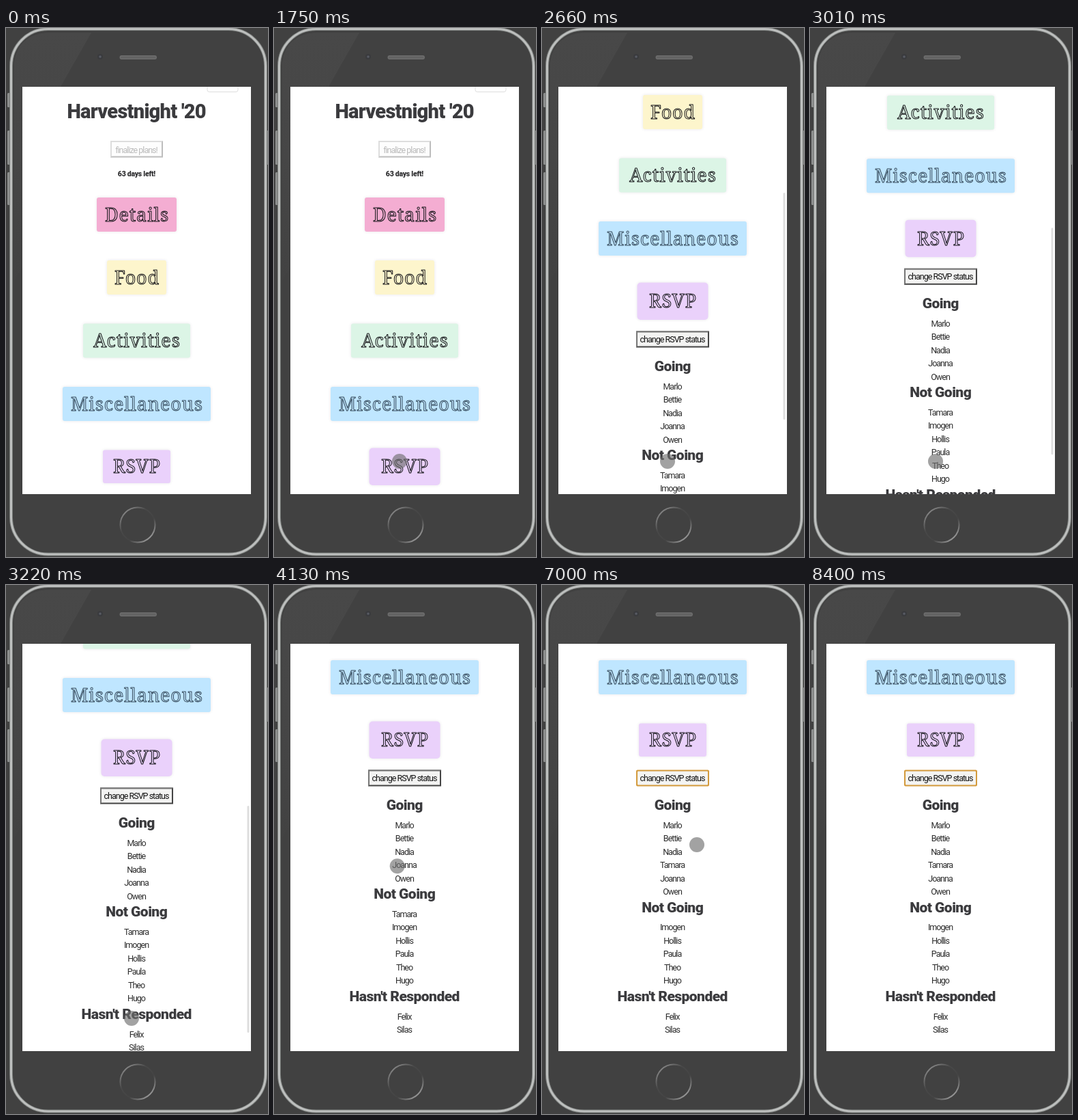
An HTML page with a canvas that plays this animation: 384 px wide and 774 px high, repeating every 8.47 s.

```html
<!DOCTYPE html>
<html lang="en">
<head>
<meta charset="utf-8">
<title>Party planner on a phone</title>
<style>
  html, body { margin: 0; width: 100%; height: 100%; overflow: hidden; background: #414141; }
  canvas { display: block; }
</style>
</head>
<body>
<canvas id="stage" width="384" height="774"></canvas>
<script>
const ctx = document.getElementById('stage').getContext('2d');
const LOOP = 8470, STEP = 70;
const SCREEN = { x: 24, y: 86, w: 335, h: 596 };
const CENTER = 191.5;

const FACES = {
  display: { style: '900', family: 'Roboto, sans-serif', advance: .48, sample: "Hasn't Responded" },
  narrow: { style: '400', family: 'Roboto, sans-serif', advance: .422, sample: 'change RSVP status' },
  hollow: { style: '400', family: '"Noto Serif", serif', advance: .552, sample: 'Miscellaneous' }
};

const CARDS = [
  { label: 'Details', x: 133, y: 248, w: 117, h: 50, color: '#f4add2' },
  { label: 'Food', x: 148, y: 340, w: 87, h: 50, color: '#fdf5cc' },
  { label: 'Activities', x: 113, y: 432.5, w: 157, h: 50, color: '#dcf5e6' },
  { label: 'Miscellaneous', x: 83, y: 525, w: 217, h: 50, color: '#bfe6ff', ink: '#34495a' },
  { label: 'RSVP', x: 142, y: 617.5, w: 99, h: 48.5, color: '#ead1fb' }
];

const MOVED = 'Tamara';
const GOING = ['Marlo', 'Bettie', 'Nadia', 'Joanna', 'Owen'];
const NOT_GOING = ['Imogen', 'Hollis', 'Paula', 'Theo', 'Hugo'];
const PENDING = ['Felix', 'Silas'];

// Keyframes: time, then values
const SCROLL = [[2150, 0], [2660, 242], [3220, 389], [3400, 415]];
const HOVER = [[910, 0], [1050, 1], [5600, 1], [5740, 0]];
const POINTER = [
  [250, 230, 790], [900, 184, 634], [3420, 184, 634], [3640, 183, 575],
  [4520, 179, 295], [5200, 179, 295], [5390, 181, 297], [5800, 181, 297],
  [6350, 227, 380], [7700, 227, 380], [7980, 228, 725], [8190, 228, 725], [8340, 231, 790]
];
const TAPS = [{ t: 1820, x: 184, y: 634 }, { t: 5250, x: 179, y: 295 }];
const FOCUS_AT = 5600, MOVE_AT = 6510;

const clamp = v => Math.max(0, Math.min(1, v));
const smooth = v => v * v * (3 - 2 * v);

function track(keys, t, ease = v => v) {
  const next = keys.findIndex(k => k[0] > t);
  if (next === 0) return keys[0].slice(1);
  if (next < 0) return keys[keys.length - 1].slice(1);
  const a = keys[next - 1], b = keys[next];
  const p = ease((t - a[0]) / (b[0] - a[0]));
  return a.slice(1).map((v, i) => v + (b[i + 1] - v) * p);
}

function box(x, y, w, h, r, color) {
  ctx.beginPath();
  ctx.roundRect(x, y, w, h, r);
  ctx.fillStyle = color;
  ctx.fill();
}

function disc(x, y, r, color) {
  ctx.beginPath();
  ctx.arc(x, y, r, 0, Math.PI * 2);
  ctx.fillStyle = color;
  ctx.fill();
}

function linear(x0, y0, x1, y1, colors) {
  const g = ctx.createLinearGradient(x0, y0, x1, y1);
  colors.forEach((c, i) => g.addColorStop(i / (colors.length - 1), c));
  return g;
}

// Each face is tracked evenly to its average advance.
function useFace(face, size) {
  ctx.letterSpacing = '0px';
  ctx.font = `${face.style} ${size}px ${face.family}`;
  const natural = ctx.measureText(face.sample).width / face.sample.length;
  const tracking = face.advance * size - natural;
  ctx.letterSpacing = tracking + 'px';
  return tracking;
}

function text(str, y, face, size, color) {
  const x = CENTER + useFace(face, size) / 2;
  const base = y + size * .36;
  ctx.textAlign = 'center';
  if (face === FACES.hollow) {
    ctx.strokeStyle = color;
    ctx.lineWidth = 1;
    ctx.lineJoin = 'round';
    ctx.strokeText(str, x, base);
  } else {
    ctx.fillStyle = color;
    ctx.fillText(str, x, base);
  }
}

function bevel(x, y, w, h, light, dark, fill) {
  box(x, y, w, h, 0, dark);
  ctx.beginPath();
  ctx.moveTo(x, y + h);
  ctx.lineTo(x, y);
  ctx.lineTo(x + w, y);
  ctx.lineTo(x + w - 2, y + 2);
  ctx.lineTo(x + 2, y + h - 2);
  ctx.fillStyle = light;
  ctx.fill();
  box(x + 2, y + 2, w - 4, h - 4, 0, fill);
}

function drawPhone() {
  ctx.fillStyle = '#414141';
  ctx.fillRect(0, 0, 384, 774);
  for (const [x, y, h] of [[2, 95, 21], [2, 150, 50], [2, 211, 48], [381, 150, 50]]) {
    box(x, y, 4, h, 1.5, '#8d8f8e');
  }

  ctx.beginPath();
  ctx.moveTo(12, 50);
  ctx.quadraticCurveTo(18, 10, 60, 7);
  ctx.lineTo(125, 7);
  ctx.lineTo(80, 86);
  ctx.lineTo(24, 86);
  ctx.lineTo(24, 350);
  ctx.lineTo(12, 370);
  ctx.fillStyle = linear(0, 7, 0, 370, ['#484848', '#464646', '#424242']);
  ctx.fill();

  ctx.beginPath();
  ctx.roundRect(7.5, 1.5, 373, 768.5, 54);
  ctx.lineWidth = 5;
  ctx.strokeStyle = '#777a78';
  ctx.stroke();
  ctx.lineWidth = 3;
  ctx.strokeStyle = '#bdbfbe';
  ctx.stroke();

  disc(138, 42, 4, '#3a3b3e');
  disc(138, 42, 1.8, '#585b64');
  box(166.5, 40, 54.5, 6, 3, '#6c6c6c');
  box(168, 41.5, 51.5, 3, 1.5, '#626262');

  ctx.beginPath();
  ctx.arc(193, 727, 25.5, 0, Math.PI * 2);
  ctx.lineWidth = 2;
  ctx.strokeStyle = linear(175, 707, 211, 747, ['#858585', '#484848', '#444444', '#999999']);
  ctx.stroke();
}

function drawCard(card, hover) {
  const gx = hover * 2.5, gy = hover * 3;
  ctx.save();
  ctx.shadowColor = 'rgba(70,60,80,.13)';
  ctx.shadowBlur = 4;
  box(card.x - gx, card.y - gy, card.w + 2 * gx, card.h + 2 * gy, 3 + hover * 2, card.color);
  ctx.restore();
  text(card.label, card.y + card.h / 2, FACES.hollow, 27, card.ink || '#141418');
}

function drawStatusButton(focused) {
  if (focused) {
    box(138, 685.5, 107, 24, 2, '#d39a3c');
    box(140, 687.5, 103, 20, 1, '#f4f4f2');
  } else {
    bevel(138, 685.5, 107, 24, '#777777', '#444444', '#f3f3f2');
  }
  text('change RSVP status', 697.7, FACES.narrow, 12.5, '#111111');
}

function drawGuests(moved) {
  const groups = [
    ['Going', moved ? [...GOING.slice(0, 3), MOVED, ...GOING.slice(3)] : GOING],
    ['Not Going', moved ? NOT_GOING : [MOVED, ...NOT_GOING]],
    ["Hasn't Responded", PENDING]
  ];
  let y = 736.5;
  for (const [heading, names] of groups) {
    text(heading, y, FACES.display, 21, '#3b3b3e');
    y += 29.5;
    for (const name of names) {
      text(name, y, FACES.narrow, 12.5, '#2c2c2c');
      y += 19.5;
    }
    y += 3.3;
  }
}

function drawPage(t) {
  const [scroll] = track(SCROLL, t);
  const [hover] = track(HOVER, t, smooth);
  ctx.save();
  ctx.beginPath();
  ctx.rect(SCREEN.x, SCREEN.y, SCREEN.w, SCREEN.h);
  ctx.clip();
  ctx.fillStyle = '#ffffff';
  ctx.fillRect(SCREEN.x, SCREEN.y, SCREEN.w, SCREEN.h);

  ctx.save();
  ctx.translate(0, -scroll);
  ctx.beginPath();
  ctx.roundRect(295, 70, 45, 23.5, 3);
  ctx.lineWidth = 1;
  ctx.strokeStyle = '#dedede';
  ctx.stroke();
  text("Harvestnight '20", 121.5, FACES.display, 29, '#3b3b3e');
  bevel(153, 165, 77, 24.5, '#dddddd', '#bdbdbd', '#fdfdfd');
  text('finalize plans!', 178, FACES.narrow, 12.5, '#bababa');
  text('63 days left!', 213, FACES.display, 10.5, '#2e2e30');
  CARDS.forEach(card => drawCard(card, card.label === 'RSVP' ? hover : 0));
  drawStatusButton(t >= FOCUS_AT);
  drawGuests(t >= MOVE_AT);
  ctx.restore();

  if (t >= 2150 && t < 3640) {
    ctx.globalAlpha = 1 - clamp((t - 3460) / 180);
    box(353.5, 106 + scroll * .558, 3, 332, 1.5, '#dedede');
  }
  ctx.restore();
}

function drawPointer(t) {
  const [x, y] = track(POINTER, t, smooth);
  disc(x, y, 11, 'rgba(110,110,110,.64)');
  for (const tap of TAPS) {
    const age = t - tap.t;
    if (age < 0 || age > 280) continue;
    ctx.globalAlpha = 1 - clamp((age - 140) / 140);
    ctx.beginPath();
    ctx.arc(tap.x, tap.y, 11 + 12 * clamp(age / 140), 0, Math.PI * 2);
    ctx.lineWidth = 3;
    ctx.strokeStyle = '#0b0b0b';
    ctx.stroke();
    ctx.globalAlpha = 1;
  }
}

let start;
function frame(now) {
  start ??= now;
  const t = Math.floor((now - start) % LOOP / STEP) * STEP;
  drawPhone();
  drawPage(t);
  drawPointer(t);
  requestAnimationFrame(frame);
}
requestAnimationFrame(frame);
</script>
</body>
</html>
```
